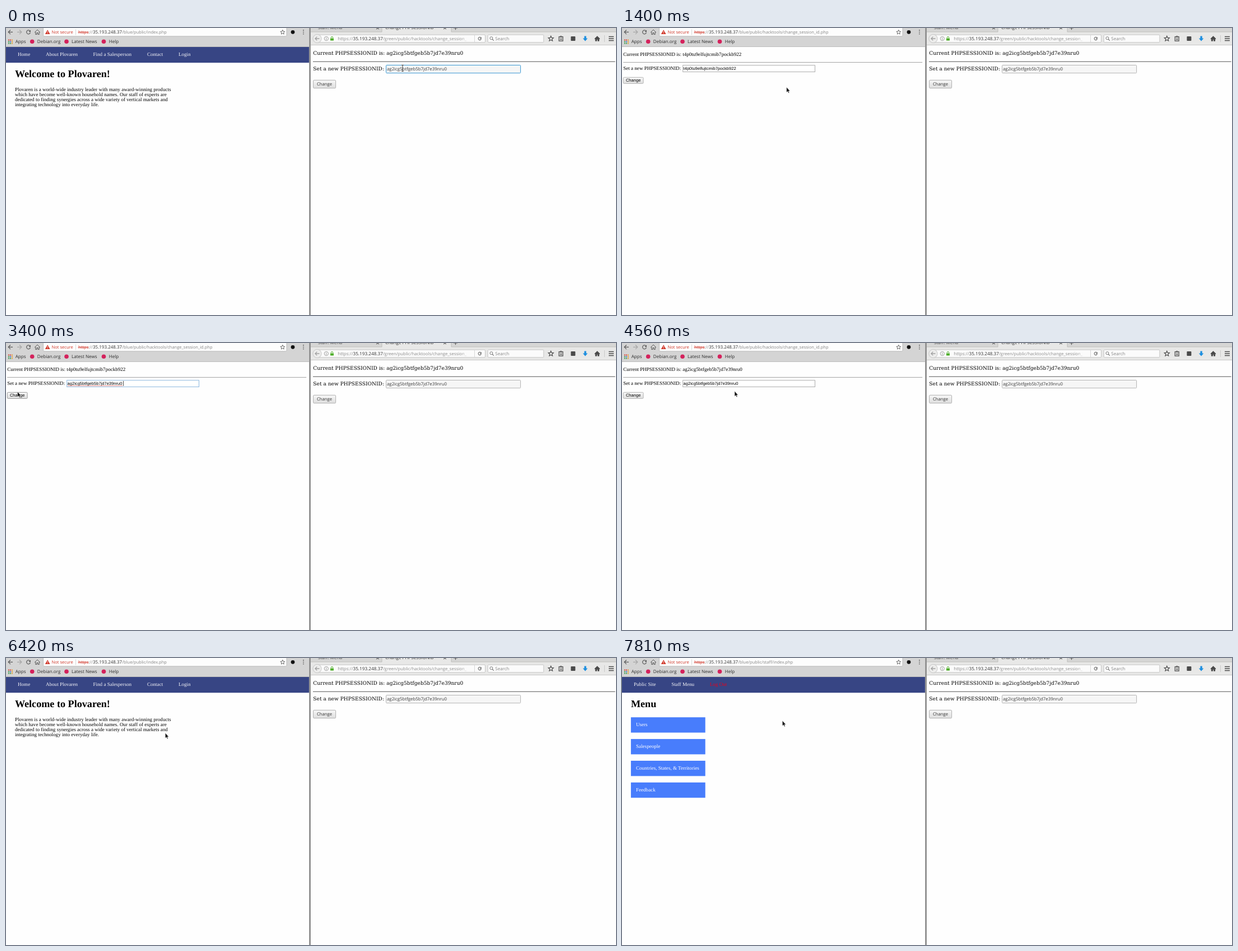
Animation, 1089 px wide and 514 px high, one loop 8 s. Source, as an HTML page:

```html
<!DOCTYPE html>
<html lang="en">
<head>
<meta charset="utf-8">
<title>Session change</title>
<style>
html, body { margin: 0; width: 100%; height: 100%; overflow: hidden; background: #fefefe; }
svg { display: block; }
text { text-rendering: geometricPrecision; white-space: pre; }
.serif { font: 9.075px "Liberation Serif", serif; }
.head { font: bold 18.15px "Liberation Serif", serif; }
.form { font: 7.56px "Liberation Sans", sans-serif; }
.deja { font: 9.1px "DejaVu Serif", serif; }
.ui { font: 8px "Open Sans", sans-serif; }
</style>
</head>
<body>
<svg id="stage" width="1089" height="514" viewBox="0 0 1089 514"></svg>
<script>
const LOOP = 8000;
const OLD_ID = 't4p0tu9elfujtcmib7pockb922';
const NEW_ID = 'ag2icg5btfgeb5b7jd7e39nru0';
const esc = s => s.replace(/&/g, '&amp;');

const text = (x, y, s, cls, fill = '#000', size = 0, id = '') =>
  `<text ${id && `id="${id}"`} x="${x}" y="${y}" class="${cls}" fill="${fill}" ${size ? `style="font-size:${size}px"` : ''}>${esc(s)}</text>`;
const rect = (x, y, w, h, fill, extra = '') =>
  `<rect x="${x}" y="${y}" width="${w}" height="${h}" fill="${fill}" ${extra}/>`;
const line = (d, color, w = 1, extra = '') =>
  `<path d="${d}" fill="none" stroke="${color}" stroke-width="${w}" ${extra}/>`;
const dot = (x, y, r, fill, extra = '') => `<circle cx="${x}" cy="${y}" r="${r}" fill="${fill}" ${extra}/>`;
const group = (id, body) => `<g id="${id}">${body}</g>`;

function star(cx, cy, r, color, w) {
  let d = '';
  for (let i = 0; i < 10; i++) {
    const a = -Math.PI / 2 + i * Math.PI / 5, q = i % 2 ? r * 0.45 : r;
    d += `${i ? 'L' : 'M'}${(cx + q * Math.cos(a)).toFixed(2)} ${(cy + q * Math.sin(a)).toFixed(2)}`;
  }
  return line(d + 'Z', color, w);
}
const house = (x, y, color, fill = 'none') =>
  `<path d="M${x - 4.6} ${y + .3}L${x} ${y - 4.2} ${x + 4.6} ${y + .3}H${x + 3.2}V${y + 4.2}H${x + 1}V${y + 1.2}H${x - 1}V${y + 4.2}H${x - 3.2}V${y + .3}Z" fill="${fill}" stroke="${color}" stroke-width="1"/>`;
const reload = (x, y, r, color) =>
  line(`M${x + r * .8} ${y - r * .6}A${r} ${r} 0 1 0 ${x + r} ${y + .6}`, color, 1.2) +
  `<path d="M${x + r + .6} ${y - r - .4}v3.6h-3.6z" fill="${color}"/>`;
const cross = (x, y, r, color, w) =>
  line(`M${x - r} ${y - r}l${2 * r} ${2 * r}M${x + r} ${y - r}l${-2 * r} ${2 * r}`, color, w);

function leftChrome() {
  const ink = '#5a5a5a';
  let s = rect(0, 0, 541, 34, '#d4d4d4') + rect(0, 33, 541, .8, '#b8b8b8');
  s += line('M12 7.3H4.3M8 3.5L4.2 7.3 8 11.1', ink, 1.2);
  s += line('M20 7.3H27.7M24 3.5L27.8 7.3 24 11.1', '#a6a6a6', 1.2);
  s += group('idle', reload(40, 7.3, 3.4, ink)) + group('busy', cross(40, 7.3, 3, ink, 1.3));
  s += house(56, 7.3, ink);
  s += rect(66.5, -3, 434.5, 17.8, '#fdfdfd', 'rx="1.5" stroke="#b0b0b0" stroke-width=".8"');
  s += '<path d="M74.2 3.2L78.6 11H69.8Z" fill="#d0382b"/>' + line('M74.2 5.7V8.3M74.2 9.1V10', '#fff', .9);
  s += text(81.5, 10.4, 'Not secure', 'ui', '#d0382b', 7.6) + rect(124, 2.5, .8, 10, '#cfcfcf');
  s += text(129, 10.4, 'https', 'ui', '#d0382b', 7.6) + line('M128.5 7.9H147.5', '#d0382b', .8);
  s += text(147.3, 10.4, '://', 'ui', '#8a8a8a', 7.6);
  s += text(155, 10.4, '35.193.248.37', 'ui', '#333', 8);
  s += text(207.3, 10.4, '', 'ui', '#858585', 7.5, 'path');
  s += star(493.8, 7.6, 4.2, ink, .9) + dot(512, 7.3, 3.4, '#111');
  for (const y of [4, 7.3, 10.6]) s += dot(531, y, .9, ink);
  ['#d9453a', '#d9453a', '#e8a13a', '#3d9d55', '#4178d4', '#e8a13a', '#3d9d55', '#3d9d55', '#e8a13a']
    .forEach((c, i) => s += rect(4 + i % 3 * 3, 20.5 + (i / 3 | 0) * 3, 2, 2, c));
  for (const x of [46.7, 108, 174.5]) s += dot(x, 24.2, 3.8, '#d4225c');
  [[16.7, 'Apps'], [55.8, 'Debian.org'], [117, 'Latest News'], [183.8, 'Help']]
    .forEach(([x, t]) => s += text(x, 27.4, t, 'ui', '#2b2b2b', 8.1));
  return s;
}

function rightChrome() {
  const ink = '#4a4a4a', edge = 'rx="1.5" stroke="#bcbcbc" stroke-width=".8"';
  let s = rect(544, 0, 545, 30.5, '#e8e8e7') + rect(544, 0, 545, 7, '#d6d6d5');
  s += rect(671, 0, 124, 8, '#e8e8e7') + line('M544 7H671V0M795 0V7H1089', '#b5b5b3', .8);
  s += text(557, 2.4, 'Staff: Menu', 'ui', '#444', 8.1) + text(677, 2.4, 'Change PHPSESSIONID', 'ui', '#333', 8.1);
  s += cross(663.5, 0, 2.2, '#555', 1.1) + cross(783.5, 0, 2.2, '#555', 1.1) + line('M799 0H806M802.5 -3V3.3', '#555', 1.2);
  s += rect(556, 12.2, 299.5, 13.6, '#fbfbfb', edge);
  s += dot(555.5, 19, 7.6, '#ededec', 'stroke="#bcbcbc" stroke-width=".8"') + line('M559.5 19H552M555.3 15.6L551.9 19 555.3 22.4', '#a0a0a0', 1.3);
  s += dot(571.8, 19, 3.6, 'none', 'stroke="#8a8a8a" stroke-width=".8"') + line('M571.8 16.8V17.7M571.8 18.4V21.2', '#8a8a8a', .9);
  s += rect(579, 18.4, 6, 4.2, '#4fae2b', 'rx=".5"') + line('M580.3 18.6V17.2a1.7 1.7 0 0 1 3.4 0V18.6', '#4fae2b', 1);
  s += text(592.3, 21.9, 'https://', 'ui', '#8c8c8c') + text(619.5, 21.9, '35.193.248.37', 'ui', '#333', 8.2);
  s += text(673, 21.9, '/green/public/hacktools/change_session_', 'ui', '#8c8c8c', 7.8);
  s += rect(812, 14, 14, 11, 'url(#fade)') + rect(836, 12.6, .8, 12.8, '#cfcfcf') + reload(845.7, 19, 2.6, '#777');
  s += rect(860.2, 12.2, 99.6, 13.6, '#fbfbfb', edge);
  s += dot(866.4, 18.2, 2.5, 'none', 'stroke="#777" stroke-width="1"') + line('M868.2 20L870.8 22.6', '#777', 1.2);
  s += text(873.3, 21.9, 'Search', 'ui', '#858585');
  s += star(972.8, 19.2, 4.8, ink, 1.2);
  s += rect(987.2, 15.6, 7, 7.6, 'none', `stroke="${ink}" stroke-width="1.2"`) + line('M989 14.8H992.4M988.8 18H992.8M988.8 20.6H992.8', ink, 1.1);
  s += rect(1008.4, 15, 8, 8, ink, 'rx="1"');
  s += '<path d="M1032.4 14.6H1035.8V18.4H1038.4L1034.1 23.4 1029.8 18.4H1032.4Z" fill="#1d8fe0"/>';
  s += house(1055.5, 19, ink, ink) + rect(1068, 13, .8, 12, '#c2c2c2');
  s += line('M1076 15.6H1085M1076 19H1085M1076 22.4H1085', ink, 1.5);
  return s + rect(544, 30, 545, .8, '#bdbdbb');
}

function rightPage() {
  let s = text(548.3, 48.4, 'Current PHPSESSIONID is: ' + NEW_ID, 'deja');
  s += rect(548, 59.7, 539.5, 1, '#555') + text(548.3, 76.4, 'Set a new PHPSESSIONID:', 'deja');
  s += rect(678.6, 66.5, 240, 14.2, '#f6f6f6', 'id="rbox" rx="1.2" stroke-width="1"');
  s += rect(679.8, 68, 107.8, 11, '#2080ba', 'id="rsel"');
  s += text(680, 76.3, NEW_ID, 'ui', '#3a3a3a', 7.83, 'rval');
  s += rect(548.6, 93.4, 40, 14.4, 'url(#btn)', 'rx="1.5" stroke="#a9a9a9" stroke-width=".9"');
  return s + text(555, 103.4, 'Change', 'ui', '#333', 7.7);
}

const navBar = items => rect(0, 33.8, 541, 28.4, '#374584') +
  items.map(([x, t, c]) => text(x, 50.2, t, 'serif', c || '#f4f4f8')).join('');

function homePage() {
  const body = ['Plovaren is a world-wide industry leader with many award-winning products',
    'which have become well-known household names. Our staff of experts are',
    'dedicated to finding synergies across a wide variety of vertical markets and',
    'integrating technology into everyday life.'];
  return navBar([[21, 'Home'], [71, 'About Plovaren'], [155.5, 'Find a Salesperson'], [252, 'Contact'], [308, 'Login']]) +
    text(15.9, 88.2, 'Welcome to Plovaren!', 'head') +
    body.map((t, i) => text(15.9, 113 + i * 9.1, t, 'serif')).join('');
}

function menuPage() {
  return navBar([[21, 'Public Site'], [88.2, 'Staff Menu'], [156.8, 'Log Out', '#e8001c']]) +
    text(15.9, 88.2, 'Menu', 'head') +
    ['Users', 'Salespeople', 'Countries, States, & Territories', 'Feedback'].map((t, i) =>
      rect(15.9, 106.2 + i * 38.9, 132.8, 27.4, '#487dfc') + text(25, 122.3 + i * 38.9, t, 'serif', '#fff')).join('');
}

function formPage() {
  let wave = 'M110 77';
  for (let x = 110; x < 208; x += 2) wave += 'l1 -.8l1 .8';
  return text(2.2, 49.8, 'Current PHPSESSIONID is: ', 'serif', '#000', 0, 'current') +
    rect(2.2, 61, 534, .9, '#9a9a9a') + text(2.2, 75, 'Set a new PHPSESSIONID:', 'serif') +
    rect(108.7, 66.8, 235.8, 11.8, '#fff', 'id="lbox" stroke-width=".9"') +
    text(109.6, 75, '', 'form', '#000', 0, 'lval') +
    `<g clip-path="url(#pick)">${rect(109.5, 68, 95, 9.6, '#3a87c8')}${text(109.6, 75, OLD_ID, 'form', '#fff')}</g>` +
    group('typed', line(wave, '#e0403a', .6) + rect(209, 68, .7, 9, '#000')) +
    rect(2.3, 88.4, 35.8, 11, 'url(#btn)', 'id="lbtn" rx="1.5" stroke-width=".8"') +
    text(6.9, 96.3, 'Change', 'form');
}

const cursors =
  group('arrow', '<path d="M0 0V9.2L2.1 7.4 3.6 10.6 5 9.9 3.6 6.9H6.3Z" fill="#111" stroke="#fff" stroke-width=".5"/>') +
  group('beam', line('M-1.8 -5.6H1.8M0 -5.6V5.6M-1.8 5.6H1.8', '#333', .9)) +
  group('hand', '<path d="M-.9 0q.9-.9 1.8 0V3.6L4.8 4.5V7.5L3.8 10H-1.2L-3.6 6.4-2.6 5.4-.9 6.6Z" fill="#fff" stroke="#111" stroke-width=".8"/>');

document.getElementById('stage').innerHTML = `<defs>
<linearGradient id="btn" x2="0" y2="1"><stop stop-color="#f7f7f7"/><stop offset="1" stop-color="#dedede"/></linearGradient>
<linearGradient id="fade"><stop stop-color="#fbfbfb" stop-opacity="0"/><stop offset="1" stop-color="#fbfbfb"/></linearGradient>
<clipPath id="pick"><rect id="span" x="109" y="66" width="0" height="14"/></clipPath></defs>` +
  rect(0, 0, 1089, 514, '#fefefe') + rightPage() + rightChrome() +
  group('home', homePage()) + group('form', formPage()) + group('menu', menuPage()) + leftChrome() +
  rect(541, 0, 1, 514, '#b4b4b4') + rect(541.8, 0, 2, 514, '#7f7f7f') + group('mouse', cursors);

const mouse = [
  [0, 708, 72, 'beam'], [520, 645, 83, 'arrow'], [640, 500, 94, 'arrow'], [760, 350, 102, 'arrow'],
  [880, 300, 102.5, 'arrow'], [1030, 297, 104, 'arrow'], [1150, 293.7, 106, 'arrow'],
  [1650, 270, 108.5, 'arrow'], [1770, 245, 107, 'arrow'], [1920, 165, 96, 'arrow'],
  [2040, 104, 76, 'beam'], [2160, 110, 75, 'beam'], [2280, 160, 76, 'beam'], [2400, 215, 77.5, 'beam'],
  [2520, 234, 78, 'beam'], [2890, 190, 77.5, 'beam'], [3040, 130, 79, 'arrow'], [3160, 65, 86, 'arrow'],
  [3280, 30, 88, 'arrow'], [3400, 20.5, 87.3, 'arrow'], [4170, 31, 92, 'arrow'], [4290, 43.5, 96.5, 'arrow'],
  [4440, 130, 92, 'arrow'], [4560, 201, 86.3, 'arrow'], [5180, 207, 120, 'arrow'], [5300, 216, 180, 'arrow'],
  [5420, 222, 222, 'arrow'], [6030, 240, 222, 'arrow'], [6150, 268, 221, 'arrow'], [6270, 282.3, 218, 'arrow'],
  [6420, 284.3, 134.3, 'arrow'], [6540, 302, 48, 'arrow'], [6660, 312, 7, 'arrow'], [6780, 320, 28, 'arrow'],
  [6900, 324, 45, 'hand'], [7540, 312, 80, 'arrow'], [7660, 297.5, 109.3, 'arrow'], [7810, 286.3, 112.3, 'arrow']
];
const pages = [[0, 'home'], [1400, 'form'], [5060, 'home'], [7420, 'menu']];
const paths = { home: '/blue/public/index.php', form: '/blue/public/hacktools/change_session_id.php', menu: '/blue/public/staff/index.php' };
const loading = [[3770, 3920], [5790, 6030], [7270, 7420]];
const picked = [[0, 0], [2280, 51], [2400, 96], [2770, 0]];

const el = {};
document.querySelectorAll('#stage [id]').forEach(n => el[n.id] = n);
const at = (list, t) => list.filter(s => s[0] <= t).pop();
const within = (t, a, b) => t >= a && t < b;
const show = (id, on) => el[id].setAttribute('visibility', on ? 'visible' : 'hidden');
const set = (id, name, v) => el[id].setAttribute(name, v);

function draw(t) {
  const page = at(pages, t)[1], [, x, y, kind] = at(mouse, t);
  for (const id of ['home', 'form', 'menu']) el[id].style.display = id === page ? '' : 'none';
  el.path.textContent = paths[page];
  const busy = loading.some(([a, b]) => within(t, a, b));
  show('busy', busy);
  show('idle', !busy);

  const chosen = within(t, 150, 1030);
  show('rsel', chosen);
  set('rval', 'fill', chosen ? '#fff' : '#3a3a3a');
  set('rbox', 'stroke', t < 1030 ? '#3596d2' : '#b2b2b2');

  el.current.textContent = 'Current PHPSESSIONID is: ' + (t < 3920 ? OLD_ID : NEW_ID);
  el.lval.textContent = t < 2770 ? OLD_ID : NEW_ID;
  set('span', 'width', at(picked, t)[1]);
  set('lbox', 'stroke', within(t, 2160, 3770) ? '#7fb0dc' : '#a3a3a3');
  show('typed', page === 'form' && within(t, 2770, 3770));
  set('lbtn', 'stroke', within(t, 3280, 4290) ? '#858585' : '#a6a6a6');
  set('lbtn', 'fill', within(t, 3650, 3770) ? '#d6d6d6' : 'url(#btn)');

  set('mouse', 'transform', `translate(${x} ${y})`);
  for (const id of ['arrow', 'beam', 'hand']) show(id, id === kind);
}

const start = performance.now();
function tick() {
  draw((performance.now() - start) % LOOP);
  requestAnimationFrame(tick);
}
tick();
</script>
</body>
</html>
```
